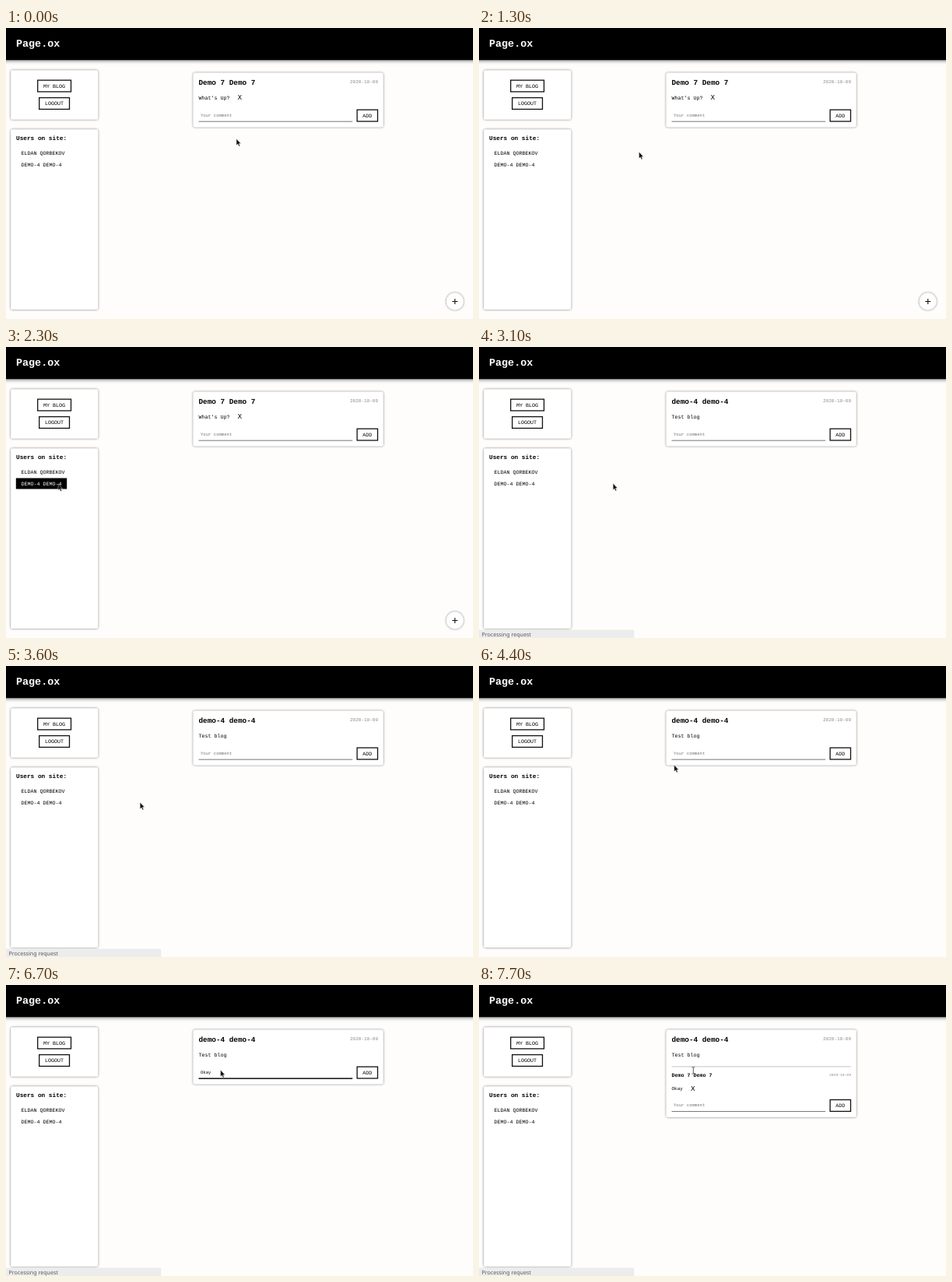
Write an HTML page that moves like this. It is 600 px wide and 374 px high and loops after 8 s.

```html
<!DOCTYPE html>
<html lang="en">
<head>
<meta charset="utf-8">
<title>Blog page</title>
<style>
  html, body { margin: 0; width: 100%; height: 100%; overflow: hidden; background: #fefdfc; }
  svg { display: block; width: 600px; height: 374px; }
  text { font-family: "Liberation Mono", monospace; font-size: 6.68px; text-rendering: geometricPrecision; white-space: pre; }
  .bold { font-weight: bold; }
  .title { font-size: 9.36px; font-weight: bold; }
  .date { font-size: 6px; fill: #8a8a8a; }
  .field { font-size: 5.6px; }
  .hint { fill: #757575; }
  .cross { font: 8.2px "DejaVu Sans", sans-serif; }
  .card { fill: #fff; filter: url(#glow); }
  .button { fill: #fff; stroke: #111; stroke-width: 1.3; }
</style>
</head>
<body>
<svg viewBox="0 0 600 374">
  <defs>
    <filter id="glow" x="-20%" y="-20%" width="140%" height="140%">
      <feDropShadow dx="0" dy="0" stdDeviation="1.4" flood-color="#000" flood-opacity=".6"/>
    </filter>
    <filter id="headGlow" x="-5%" y="-20%" width="110%" height="150%">
      <feDropShadow dx="0" dy="0.5" stdDeviation="2.6" flood-color="#000" flood-opacity=".6"/>
    </filter>
  </defs>
  <rect width="600" height="374" fill="#fefdfc"/>
  <rect x="-10" y="-10" width="620" height="51.2" filter="url(#headGlow)"/>
  <text x="13" y="24.4" fill="#fff" class="bold" style="font-size:13.4px">Page.ox</text>

  <rect class="card" x="6.3" y="54.5" width="111.8" height="63" rx="2"/>
  <rect class="button" x="40.7" y="67.1" width="42.8" height="14.8"/>
  <text x="48" y="76.5">MY BLOG</text>
  <rect class="button" x="42.7" y="89.6" width="38.8" height="14.8"/>
  <text x="50" y="99">LOGOUT</text>

  <rect class="card" x="6.3" y="130.4" width="111.8" height="231.3" rx="2"/>
  <text x="13" y="144" class="bold" style="font-size:7.75px">Users on site:</text>
  <text x="19.5" y="163.2">ELDAN QORBEKOV</text>
  <rect id="rowBack" x="12.8" y="168.5" width="65.4" height="14"/>
  <text id="rowText" x="19.5" y="177.6">DEMO-4 DEMO-4</text>

  <rect id="post" class="card" x="240.7" y="57.8" width="243.8" height="69.4" rx="2"/>
  <text id="author" class="title" x="247.5" y="73"></text>
  <text class="date" x="442" y="71.3">2020-10-09</text>
  <text id="body" x="247.5" y="92"></text>
  <text id="postCross" class="cross" x="297.4" y="91.8">X</text>

  <g id="comment">
    <rect x="247.5" y="104.4" width="230.3" height="1" fill="#c4c4c4"/>
    <text class="bold" x="247.5" y="118">Demo 7 Demo 7</text>
    <text class="date" x="450" y="117" style="font-size:4.67px">2020-10-09</text>
    <text x="247.5" y="135.2" style="font-size:6px">Okay</text>
    <text class="cross" x="272" y="135.8">X</text>
  </g>

  <g id="form">
    <text id="input" class="field" x="250" y="113.6"></text>
    <rect id="caret" y="109" width=".7" height="7"/>
    <rect id="underline" x="247.5" width="197.7"/>
    <rect class="button" x="451.1" y="105.1" width="26.4" height="14.9"/>
    <text x="458.2" y="114.8">ADD</text>
  </g>

  <g id="plus">
    <circle class="card" cx="576.7" cy="351.4" r="10.8"/>
    <path d="M573.3 351.5h7M576.8 348v7" stroke="#111" stroke-width="1.1"/>
  </g>

  <g id="status">
    <path d="M0 363.6H197.8q1.6 0 1.6 1.6V374H0z" fill="#ececec"/>
    <text x="3.4" y="372" fill="#5c5c5c" style="font:7.1px 'Noto Sans',sans-serif">Processing request</text>
  </g>

  <g id="pointer">
    <path id="arrow" d="M0 0V8.4L1.9 6.7 3.2 9.7 4.6 9.1 3.3 6.2H5.8Z" fill="#111" stroke="#fff" stroke-width=".4"/>
    <path id="hand" d="M-.8 5.6V.8Q-.1-.3 .7 .8V3.8L4.2 4.5Q5 4.8 4.9 5.7L4.2 9.8H.3L-2.6 6.3Q-2.5 5-.8 5.6Z" fill="#fff" stroke="#222" stroke-width=".8" stroke-linejoin="round"/>
    <path id="beam" d="M-1.9-4.3Q-.3-4.3 0-3.6Q.3-4.3 1.9-4.3M0-3.6V3.7M-1.9 4.4Q-.3 4.4 0 3.7Q.3 4.4 1.9 4.4" fill="none" stroke="#333" stroke-width=".8"/>
  </g>
</svg>
<script>
const LOOP = 8000, STEP = 100;
const el = id => document.getElementById(id);
const show = (id, on) => el(id).setAttribute('display', on ? 'inline' : 'none');
const set = (id, attrs) => { for (const k in attrs) el(id).setAttribute(k, attrs[k]); };
const within = (t, a, b) => t >= a && t < b;

// Pointer stops: time, x, y
const path = [
  [0, 296, 142.4], [900, 296, 142.4], [1000, 238.3, 154.8], [1200, 238.3, 154.8],
  [1500, 140, 168], [1800, 78, 175.6], [2000, 68, 175.6], [2200, 68, 175.6],
  [2300, 67, 175.8], [2700, 67, 175.8], [2900, 117, 172.5], [3000, 117, 172.5],
  [3100, 172.2, 175.3], [3600, 172.2, 175.3], [4200, 242.5, 133], [4300, 242.5, 133],
  [4700, 275.3, 109.8], [6200, 275.3, 109.8], [6300, 275.6, 109.3], [7600, 275.6, 109.3],
  [7700, 275.3, 109.8], [LOOP, 275.3, 109.8]
];

function pointerAt(t) {
  const i = path.findIndex(p => p[0] > t);
  const [t0, x0, y0] = path[i - 1], [t1, x1, y1] = path[i];
  const k = (t - t0) / (t1 - t0);
  return [x0 + (x1 - x0) * k, y0 + (y1 - y0) * k];
}

function typedAt(t) {
  const keys = [5600, 5700, 5900, 6000];
  return 'Okay'.slice(0, keys.filter(k => t >= k).length);
}

const gray = v => { const c = Math.round(v * 255); return `rgb(${c},${c},${c})`; };

function draw(now) {
  const t = Math.floor((now % LOOP) / STEP) * STEP;
  const opened = t >= 3100, sent = t >= 7100;

  const hover = within(t, 1800, 3100) ? Math.min(1, 0.64 + (t - 1800) / 350) : 0;
  set('rowBack', { 'fill-opacity': hover });
  set('rowText', { fill: gray(hover * 0.75 + (hover === 1 ? 0.25 : 0)) });

  el('author').textContent = opened ? 'demo-4 demo-4' : 'Demo 7 Demo 7';
  el('body').textContent = opened ? 'Test blog' : "What's Up?";
  show('postCross', !opened);
  show('plus', !opened);
  show('comment', sent);
  set('post', { height: sent ? 111.9 : 69.4 });
  set('form', { transform: `translate(0 ${sent ? 42.4 : 0})` });

  const typed = sent ? '' : typedAt(t);
  el('input').textContent = typed || 'Your comment';
  set('input', { class: typed ? 'field' : 'field hint' });
  set('caret', { x: 250 + typed.length * 3.36 });
  show('caret', within(t, 4900, 5400) || within(t, 5600, 6600));
  const focus = within(t, 4900, 7100) ? Math.min(1, (t - 4800) / 200) : 0;
  set('underline', { y: 119.7 - 0.3 * focus, height: 0.9 + 0.6 * focus, fill: gray(0.42 - 0.36 * focus) });

  show('status', within(t, 3100, 3700) || t >= 6600);

  const [x, y] = pointerAt(t);
  const hand = within(t, 1800, 2300);
  const beam = within(t, 4600, 6300) || t >= 7700;
  set('pointer', { transform: `translate(${x} ${y})` });
  show('hand', hand);
  show('beam', beam);
  show('arrow', !hand && !beam);
}

const start = performance.now();
function tick() {
  draw(performance.now() - start);
  requestAnimationFrame(tick);
}
tick();
</script>
</body>
</html>
```
